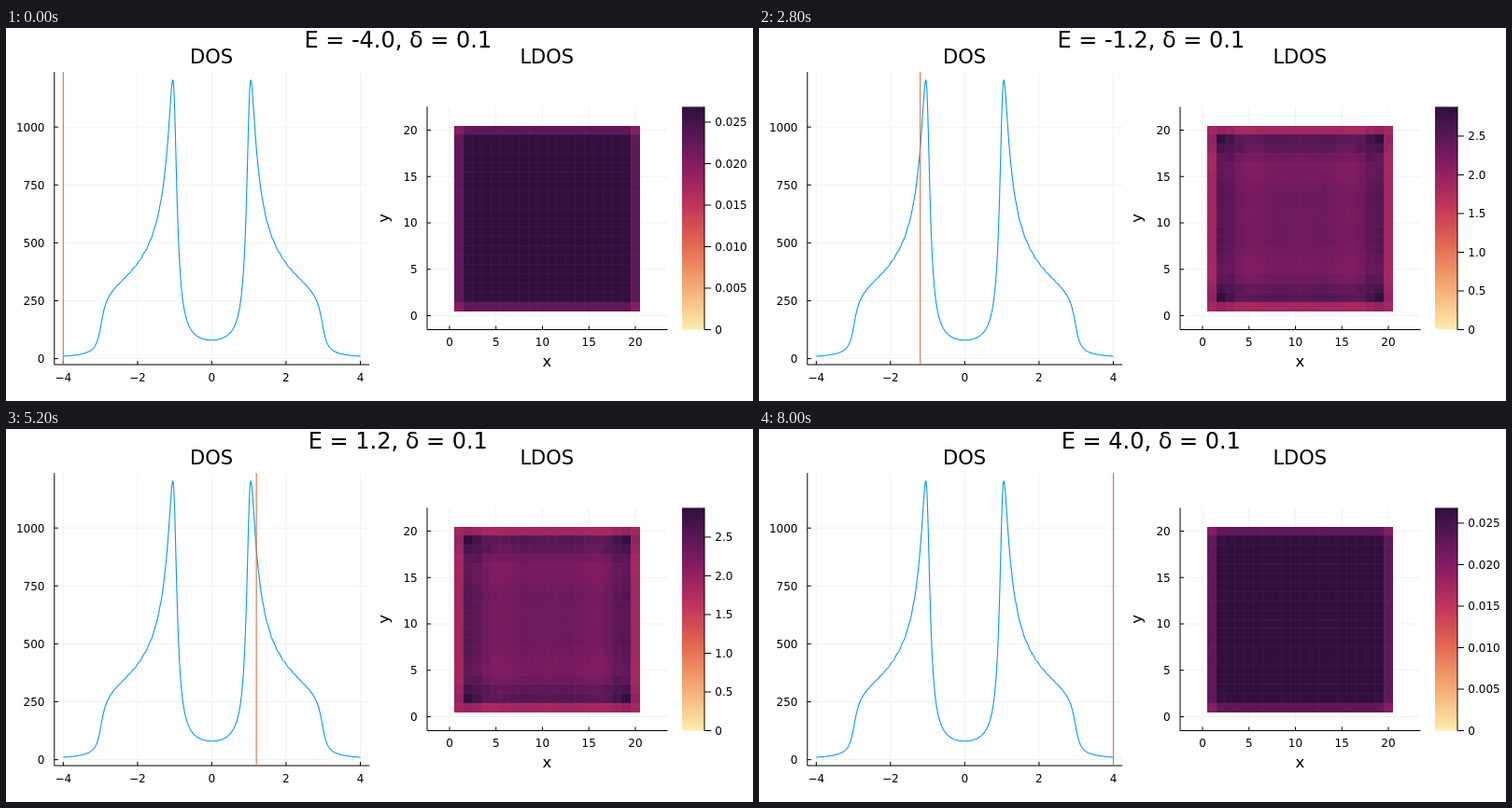
An HTML page that plays this animation: 800 px wide and 400 px high, repeating every 8100 ms.

```html
<!DOCTYPE html>
<html lang="en">
<head>
<meta charset="utf-8">
<title>DOS and LDOS</title>
<style>
html, body { margin: 0; width: 100%; height: 100%; overflow: hidden; background: #fff; }
svg { display: block; width: 800px; height: 400px; font: 12px "DejaVu Sans", sans-serif; }
</style>
</head>
<body>
<svg id="stage" viewBox="0 0 800 400"></svg>
<script>
const L = 20, DELTA = 0.1, SCALE = 3.05, ORDER = 160;
const MATTER = [[253,237,176], [250,205,145], [246,173,119], [240,142,98], [231,109,84], [216,80,83],
  [195,56,90], [168,40,96], [138,29,99], [107,24,93], [76,21,80], [47,15,61]];

// ---- Physics: open Chern insulator, H = sin kx sx + sin ky sy + (1 + cos kx + cos ky) sz ----

const W = L + 2, SIZE = W * W * 4;   // padded lattice; each site holds re a, im a, re b, im b

// next = f * H v - prev, written over prev
function step(v, prev, f) {
  const row = 4 * W;
  for (let y = 1; y <= L; y++) for (let x = 1; x <= L; x++) {
    const o = 4 * (y * W + x), e = o + 4, w = o - 4, n = o + row, s = o - row;
    const sum = i => v[e + i] + v[w + i] + v[n + i] + v[s + i];
    const dx = i => v[e + i] - v[w + i];
    const dy = i => v[n + i] - v[s + i];
    prev[o] = f * (v[o] + (sum(0) + dx(3) - dy(2)) / 2) - prev[o];
    prev[o + 1] = f * (v[o + 1] + (sum(1) - dx(2) - dy(3)) / 2) - prev[o + 1];
    prev[o + 2] = f * (-v[o + 2] + (-sum(2) + dx(1) + dy(0)) / 2) - prev[o + 2];
    prev[o + 3] = f * (-v[o + 3] + (-sum(3) - dx(0) + dy(1)) / 2) - prev[o + 3];
  }
}

// Even Chebyshev moments <r|T_2n(H / SCALE)|r>; particle-hole symmetry cancels the odd ones
function siteMoments(x, y) {
  let cur = new Float64Array(SIZE), next = new Float64Array(SIZE);
  cur[4 * ((y + 1) * W + x + 1)] = 1;
  const mu = new Float64Array(ORDER);
  for (let n = 0; n < ORDER; n++) {
    let norm = 0;
    for (let i = 0; i < SIZE; i++) norm += cur[i] * cur[i];
    mu[n] = 2 * norm - 1;
    step(cur, next, (n ? 2 : 1) / SCALE);
    [cur, next] = [next, cur];
  }
  return mu;
}

// Weights that turn moments into -Im G(E + i DELTA), both orbitals included
function weights(E) {
  const x = E / SCALE, y = DELTA / SCALE;
  const p = x * x - y * y - 1, m = Math.hypot(p, 2 * x * y);
  const rr = Math.sqrt(Math.max(0, m + p) / 2) * (x < 0 ? -1 : 1), ri = Math.sqrt((m - p) / 2);
  const wr = x - rr, wi = y - ri;
  const ur = wr * wr - wi * wi, ui = 2 * wr * wi;
  let gr = rr / m, gi = -ri / m;
  const c = new Float64Array(ORDER);
  for (let n = 0; n < ORDER; n++) {
    c[n] = -(n ? 4 : 2) / SCALE * gi;
    [gr, gi] = [gr * ur - gi * ui, gr * ui + gi * ur];
  }
  return c;
}

const dot = (a, b) => {
  let s = 0;
  for (let i = 0; i < ORDER; i++) s += a[i] * b[i];
  return s;
};

// The square's symmetry leaves one eighth of the sites to solve
const moments = {}, total = new Float64Array(ORDER);
for (let b = 0; b < L / 2; b++) for (let a = 0; a <= b; a++) {
  const mu = moments[a + "," + b] = siteMoments(a, b);
  const copies = a === b ? 4 : 8;
  mu.forEach((v, n) => total[n] += copies * v);
}
function siteKey(x, y) {
  const u = Math.min(x, L - 1 - x), v = Math.min(y, L - 1 - y);
  return Math.min(u, v) + "," + Math.max(u, v);
}

// ---- Drawing ----

const stage = document.getElementById("stage");
function add(tag, attrs, parent = stage) {
  const el = document.createElementNS("http://www.w3.org/2000/svg", tag);
  for (const k in attrs) el.setAttribute(k, attrs[k]);
  parent.appendChild(el);
  return el;
}
function text(str, x, y, size = 12, anchor = "middle", parent = stage) {
  const el = add("text", { x, y, "font-size": size, "text-anchor": anchor }, parent);
  el.textContent = str;
  return el;
}
const line = (x1, y1, x2, y2, stroke = "#000", parent = stage) =>
  add("line", { x1, y1, x2, y2, stroke }, parent);

function axes(box, X, Y, xs, ys) {
  const [l, t, r, b] = box;
  xs.forEach(v => line(X(v), t, X(v), b, "#f1f1f1"));
  ys.forEach(v => line(l, Y(v), r, Y(v), "#f1f1f1"));
  line(l, b, r, b);
  line(l, t, l, b);
  xs.forEach(v => {
    line(X(v), b, X(v), b - 4);
    text(String(v).replace("-", "\u2212"), X(v), b + 17.5);
  });
  ys.forEach(v => {
    line(l, Y(v), l + 4, Y(v));
    text(v, l - 10.3, Y(v) + 4.4, 12, "end");
  });
}

const dosX = E => 220.4 + 39.77 * E, dosY = v => 354.6 - 0.2484 * v;
const mapX = v => 475 + 9.95 * v, mapY = v => 308.5 - 9.95 * v;

const title = text("", 419.8, 21.3, 24);
text("DOS", 220, 38.3, 21);
text("LDOS", 579.3, 38.3, 21);
axes([51.8, 47.2, 389.2, 361], dosX, dosY, [-4, -2, 0, 2, 4], [0, 250, 500, 750, 1000]);
axes([451, 84.5, 708.5, 323.5], mapX, mapY, [0, 5, 10, 15, 20], [0, 5, 10, 15, 20]);
text("x", 579.5, 362.7, 16.5);
text("y", 0, 0, 16.5).setAttribute("transform", "translate(410 203.8) rotate(-90)");

let curve = "";
for (let i = -400; i <= 400; i++) {
  const E = i / 100;
  curve += (curve ? "L" : "M") + dosX(E).toFixed(2) + " " + dosY(dot(weights(E), total)).toFixed(2);
}
add("path", { d: curve, fill: "none", stroke: "#009afa", "stroke-width": 1.1, "stroke-linejoin": "round" });
const marker = line(0, 47.2, 0, 361, "#e26f46");
marker.setAttribute("stroke-width", 1.1);

const map = add("g", { "shape-rendering": "crispEdges" });
const cells = [];
for (let y = 0; y < L; y++) for (let x = 0; x < L; x++) {
  const el = add("rect", { x: mapX(x + 0.5), y: mapY(y + 1.5), width: 9.95, height: 9.95 }, map);
  cells.push({ el, key: siteKey(x, y) });
}
const seams = add("g", { opacity: 0.15, "shape-rendering": "crispEdges" });
for (let i = 1; i < L; i++) {
  line(mapX(i + 0.5), mapY(20.5), mapX(i + 0.5), mapY(0.5), "#6e4658", seams);
  line(mapX(0.5), mapY(i + 0.5), mapX(20.5), mapY(i + 0.5), "#6e4658", seams);
}

const BAR = { x: 724, top: 84.5, width: 24, height: 239 };
const ramp = add("linearGradient", { id: "ramp", x1: 0, y1: 1, x2: 0, y2: 0 });
MATTER.forEach((c, i) => add("stop", { offset: i / 11, "stop-color": `rgb(${c})` }, ramp));
add("rect", { x: BAR.x, y: BAR.top, width: BAR.width, height: BAR.height, fill: "url(#ramp)" });
line(748, BAR.top, 748, BAR.top + BAR.height);
const barTicks = add("g", {});

function colour(f) {
  const p = Math.min(f, 1) * 11, i = Math.min(10, Math.floor(p));
  return `rgb(${MATTER[i].map((v, k) => Math.round(v + (MATTER[i + 1][k] - v) * (p - i)))})`;
}

function drawBarTicks(max) {
  const n = Math.floor(Math.log10(max)), factor = max / 10 ** n;
  const gap = +((factor > 5 ? 1 : factor > 2.5 ? 0.5 : 0.25) * 10 ** n).toPrecision(2);
  const digits = (String(gap).split(".")[1] || "").length;
  barTicks.replaceChildren();
  for (let i = 0; i * gap <= max; i++) {
    const y = BAR.top + BAR.height * (1 - i * gap / max);
    line(748, y, 755, y, "#000", barTicks);
    text(i ? (i * gap).toFixed(digits) : "0", 759.3, y + 4.4, 12, "start", barTicks);
  }
}

function draw(E) {
  title.textContent = `E = ${E.toFixed(1)}, δ = ${DELTA}`;
  marker.setAttribute("x1", dosX(E));
  marker.setAttribute("x2", dosX(E));
  const c = weights(E), ldos = {};
  for (const k in moments) ldos[k] = dot(c, moments[k]);
  const max = Math.max(...Object.values(ldos));
  cells.forEach(({ el, key }) => el.setAttribute("fill", colour(ldos[key] / max)));
  drawBarTicks(max);
}

let shown = -1;
function tick() {
  const k = Math.floor(performance.now() % 8100 / 100);
  if (k !== shown) draw(((shown = k) - 40) / 10);
  requestAnimationFrame(tick);
}
tick();
</script>
</body>
</html>
```
